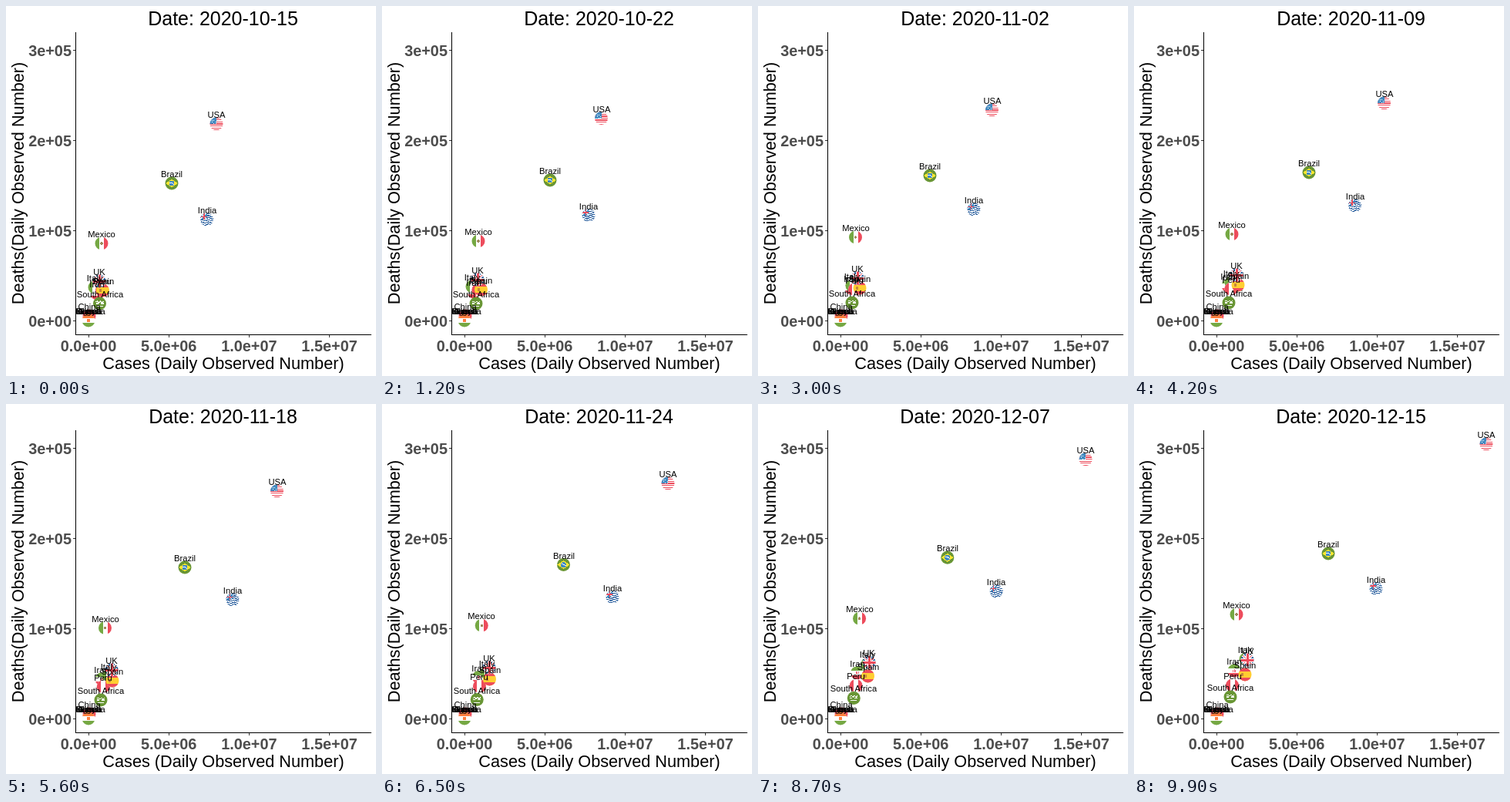
An HTML page that plays this animation: 480x480 px, repeating every 10 s.

```html
<!DOCTYPE html>
<html lang="en">
<head>
<meta charset="utf-8">
<title>Cases and deaths by country</title>
<style>
  html, body { margin: 0; width: 100%; height: 100%; overflow: hidden; background: #fff; }
  svg { display: block; width: 480px; height: 480px; font-family: Arial, "Liberation Sans", sans-serif; }
  .tick { font-size: 19.9px; font-weight: bold; fill: #4d4d4d; }
  .axis { font-size: 21.7px; }
  .name { font-size: 11.2px; text-anchor: middle; }
  .mid { text-anchor: middle; }
  .end { text-anchor: end; }
</style>
</head>
<body>
<svg viewBox="0 0 480 480">
  <defs>
    <clipPath id="disc"><circle r="8.5"/></clipPath>
    <clipPath id="panel"><rect x="91" y="34" width="383" height="393"/></clipPath>
  </defs>
  <text id="date" class="mid" x="281.5" y="25" font-size="25"></text>
  <text class="axis mid" x="282" y="471">Cases (Daily Observed Number)</text>
  <text class="axis mid" transform="translate(23 230) rotate(-90)">Deaths(Daily Observed Number)</text>
  <g id="ticks" stroke-width="1"></g>
  <path d="M90.5 34V427M90 426.5H474" stroke="#000" fill="none"/>
  <g clip-path="url(#panel)">
    <g id="flags"></g>
    <g id="names"></g>
  </g>
</svg>
<script>
const NS = 'http://www.w3.org/2000/svg';
const byId = id => document.getElementById(id);
function add(parent, tag, attrs, text) {
  const el = document.createElementNS(NS, tag);
  for (const key in attrs) el.setAttribute(key, attrs[key]);
  if (text) el.textContent = text;
  return parent.appendChild(el);
}

// Flag drawing: every flag fills a 17px disc centred on 0,0.
const RED = '#ed4c5c', GREEN = '#75a843', OLIVE = '#699635', BLUE = '#428bc1',
      NAVY = '#2a5f9e', WHITE = '#fff', GOLD = '#ffce31', ORANGE = '#ff7f3f';
const box = (x, y, w, h, fill) => `<rect x="${x}" y="${y}" width="${w}" height="${h}" fill="${fill}"/>`;
const dot = (r, fill) => `<circle r="${r}" fill="${fill}"/>`;
const line = (d, stroke, w) => `<path d="${d}" stroke="${stroke}" stroke-width="${w}" fill="none"/>`;
const field = fill => box(-9, -9, 18, 18, fill);
const bars = (a, b, c) => field(b) + box(-9, -9, 6, 18, a) + box(3, -9, 6, 18, c);
const bands = (a, b, c) => field(b) + box(-9, -9, 18, 6, a) + box(-9, 3, 18, 6, c);

function stripes() {
  let out = field(WHITE);
  for (let y = -8.5; y < 9; y += 2.6) out += box(-9, y, 18, 1.3, RED);
  out += box(-9, -9, 9, 9, BLUE);
  for (let i = 0; i < 6; i++) out += box(-6 + i % 3 * 2.4, -5 + (i >> 1) * 2, 1, 1, WHITE);
  return out;
}
function waves() {
  let out = field(WHITE);
  for (let y = -7; y < 9; y += 2.7) out += line(`M-9 ${y}q2.2-1.6 4.5 0t4.5 0t4.5 0t4.5 0`, NAVY, 1.2);
  return out + box(-9, -9, 9, 9, BLUE) + line('M-9-9L0 0M-9 0L0-9', WHITE, 1.2) +
    line('M-3.5-9V0M-9-3.5H0', RED, 1.4);
}
const cross = field(NAVY) + line('M-9-9L9 9M-9 9L9-9', WHITE, 3) + line('M-9-9L9 9M-9 9L9-9', RED, 1) +
  line('M0-9V9M-9 0H9', WHITE, 5) + line('M0-9V9M-9 0H9', RED, 3);

const flags = {
  Brazil: field(OLIVE) + '<path d="M-8 0L0-5.5L8 0L0 5.5Z" fill="#ffe62e"/>' + dot(3.5, BLUE) +
    line('M-3-1Q1-1 3 1.5', WHITE, 1),
  China: field(RED) + box(-5, -4, 3, 3, GOLD),
  India: waves(),
  Iran: bands(GREEN, WHITE, RED) + line('M-1.5-1.5V1.5M0-2V2M1.5-1.5V1.5', RED, .8),
  Italy: bars(GREEN, WHITE, RED),
  Mexico: bars(GREEN, WHITE, RED) + dot(1.8, '#a08a5c'),
  Niger: bands(ORANGE, WHITE, GREEN) + dot(2.5, ORANGE),
  Peru: bars(RED, WHITE, RED),
  'South Africa': field(OLIVE) + line('M-5-2L-3-3L-1-1L1-3L3-1L5-3M-5 0H-2M1 0H5', WHITE, 1.1) + box(-4, 3, 8, 1, WHITE),
  Spain: field(GOLD) + box(-9, -9, 18, 5, RED) + box(-9, 4, 18, 5, RED) + box(-5, -2, 3, 4, '#c8873c'),
  UK: cross,
  USA: stripes()
};

// Positions as x,y pairs at the key steps (or first and last only).
const keys = [0, 12, 30, 42, 56, 74, 99];
const paths = {
  Brazil: '215,230 218,226 223,220 227,216 232,212 239,205 252,194',
  China: '108,402',
  India: '260.5,277 268,271.5 280,264 286.5,259 294,254 304,247 314,239.5',
  Iran: '118,373 119,371 121,366 122,363 124,357 127,352 130,346',
  Italy: '115,365 117,364 122,363 126,359 133,353 139,344 145,331',
  Mexico: '124,308 125,305 126.5,300 127,296 128.5,290.5 130,284 133,273',
  Peru: '124.5,369 127.5,365',
  'South Africa': '121.5,386 122,386 122,385 123,385 123,384 123.5,383 125,380',
  Spain: '125.5,369 128.5,368 132,366 135,362 138,359 141,355 144,351',
  UK: '121,357 124,355 129,353 133,349 137,345 141,339 147,332',
  USA: '273,153 284.5,145.5 303.5,135 324.5,126 351.5,113 390.5,93 457,52',
  Niger: '107,408'
};

const items = Object.entries(paths).map(([name, text]) => {
  const flag = add(byId('flags'), 'g', {});
  flag.innerHTML = `<g clip-path="url(#disc)" shape-rendering="crispEdges">${flags[name]}</g>`;
  const label = add(byId('names'), 'text', { class: 'name' }, name);
  return { flag, label, points: text.split(' ').map(p => p.split(',').map(Number)) };
});
for (const name of ['Australia', 'Nigeria', 'Kenya', 'Ghana'])
  add(byId('names'), 'text', { class: 'name', x: 107, y: 400 }, name);

['0.0e+00', '5.0e+06', '1.0e+07', '1.5e+07'].forEach((text, i) => {
  const x = 107 + i * 104.2;
  add(byId('ticks'), 'text', { class: 'tick mid', x, y: 448 }, text);
  add(byId('ticks'), 'path', { d: `M${Math.floor(x) + .5} 427v3`, stroke: '#333' });
});
['0e+00', '1e+05', '2e+05', '3e+05'].forEach((text, i) => {
  const y = 408 - i * 116.9;
  add(byId('ticks'), 'text', { class: 'tick end', x: 85, y: y + 7.5 }, text);
  add(byId('ticks'), 'path', { d: `M87 ${Math.floor(y) + .5}h3`, stroke: '#333' });
});

function place(points, step) {
  if (points.length === 1) return points[0];
  const stops = points.length === 2 ? [0, 99] : keys;
  let i = 0;
  while (i < stops.length - 2 && step >= stops[i + 1]) i++;
  const k = (step - stops[i]) / (stops[i + 1] - stops[i]);
  return points[i].map((v, axis) => v + (points[i + 1][axis] - v) * k);
}

const start = Date.UTC(2020, 9, 15);
let shown = -1;
function draw(now) {
  const step = Math.floor(now % 10000 / 100);
  if (step !== shown) {
    shown = step;
    const day = Math.floor(step * 61 / 99);
    byId('date').textContent = 'Date: ' + new Date(start + day * 864e5).toISOString().slice(0, 10);
    for (const { flag, label, points } of items) {
      const [x, y] = place(points, step);
      flag.setAttribute('transform', `translate(${x} ${y})`);
      label.setAttribute('x', Math.round(x));
      label.setAttribute('y', Math.round(y - 8));
    }
  }
}
const origin = performance.now();
function loop() {
  draw(performance.now() - origin);
  requestAnimationFrame(loop);
}
loop();
</script>
</body>
</html>
```
